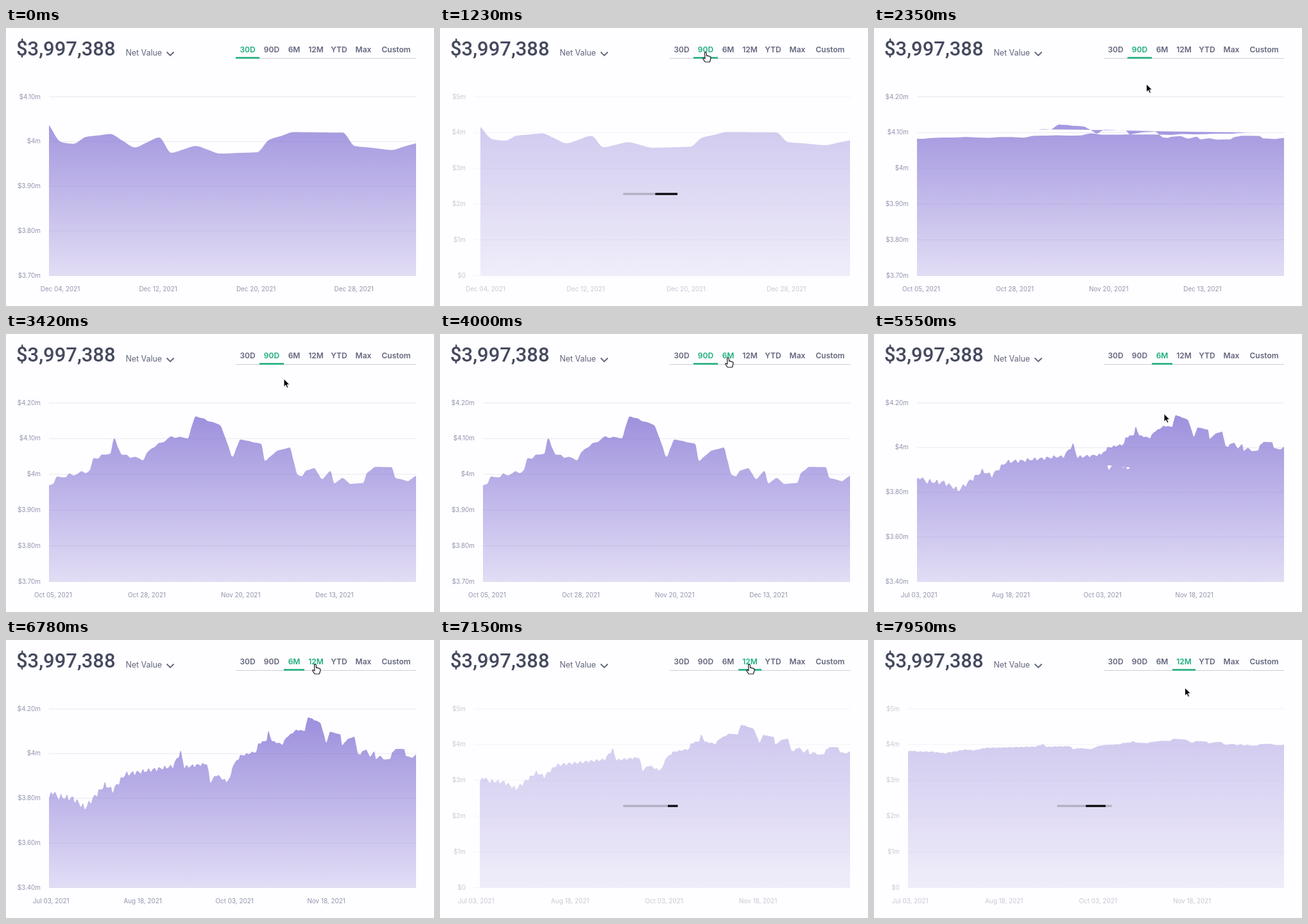
These frames come from a looping animation (667 px wide and 434 px high, 8 s). An HTML page:

```html
<!DOCTYPE html>
<html lang="en">
<head>
<meta charset="utf-8">
<title>Net value chart</title>
<style>
html, body { margin: 0; width: 100%; height: 100%; overflow: hidden; background: #fefdff; }
svg { display: block; width: 667px; height: 434px; font-family: Inter, sans-serif; }
.total { font: 500 31px Roboto, sans-serif; fill: #454a5f; }
.kind { font-size: 12.4px; fill: #5f647b; }
.tab { font-size: 12px; font-weight: 600; text-anchor: middle; fill: #62667c; }
.tab.on { fill: #1aae7a; }
.y, .x { font-size: 9.9px; fill: #8f95ad; }
.y { text-anchor: end; }
.x { text-anchor: middle; }
.grid { stroke: #e9e8ee; }
</style>
</head>
<body>
<svg viewBox="0 0 667 434">
  <defs>
    <linearGradient id="fade" gradientUnits="userSpaceOnUse" x1="0" x2="0" y1="107" y2="387">
      <stop stop-color="#7e6cd2" stop-opacity=".79"/>
      <stop offset="1" stop-color="#7e6cd2" stop-opacity=".22"/>
    </linearGradient>
    <clipPath id="plot"><rect id="frame" width="667" height="434"/></clipPath>
  </defs>
  <text class="total" x="16" y="42.5">$3,997,388</text>
  <text class="kind" x="186.5" y="42.5">Net Value</text>
  <path d="M250.5 37.5L256 43L261.5 37.5" fill="none" stroke="#5f647b" stroke-width="1.8"/>
  <path d="M358 47.5H639" stroke="#cfced6"/>
  <g id="tabs"></g>
  <rect id="mark" y="45.3" height="2.5" fill="#1aae7a"/>
  <g id="chart">
    <g id="axes"></g>
    <path id="area" fill="url(#fade)" clip-path="url(#plot)"/>
  </g>
  <g id="loader">
    <rect x="285.5" y="257.5" width="85" height="3.2" fill="#b1aebf"/>
    <rect id="bar" y="257.5" height="3.2" fill="#08080c"/>
  </g>
  <path id="arrow" d="M0 0V12.5L2.9 9.9L4.9 14.3L7 13.4L5.1 9.1H9Z" fill="#0b0b0f" stroke="#fff" stroke-width=".9"/>
  <path id="hand" d="M-1.5 1.2C-1.5-.5 1-.5 1.2 1.2L1.6 5.5L3 5.2L4.2 5.9L5.6 5.8L6.5 6.8Q8 6.5 8 8.2L7.5 11.5L6.2 15H-.8L-3.8 10.8Q-4.8 9-3.4 8.7L-1 10Z" fill="#fff" stroke="#1b1b24" stroke-width="1.2" stroke-linejoin="round"/>
</svg>
<script>
const LOOP = 8000, RIGHT = 639, TOP = 107.5, BASE = 386.5;
const $ = id => document.getElementById(id);
const lerp = (a, b, p) => a + (b - a) * p;
const clamp = p => Math.max(0, Math.min(1, p));
const sine = p => (1 - Math.cos(Math.PI * clamp(p))) / 2;

// Turning points of the curve: day, value in thousands.
const turns = [
  [0, 3800], [2, 3832], [4, 3808], [12, 3800], [18, 3757], [28, 3861], [32, 3836], [38, 3907], [62, 3943],
  [66, 4006], [68, 3940], [79, 3955], [81, 3875], [84, 3905], [89, 3875], [91, 3896], [92, 3943],
  [96, 3990], [104, 4010], [105, 4044], [109, 4060], [110, 4097], [112, 4055], [117, 4042], [119, 4072],
  [124, 4105], [128, 4102], [130, 4163], [136, 4138], [139, 4050], [141, 4098], [146, 4085], [147, 4038],
  [150, 4066], [153, 4075], [155, 3999], [156, 3995], [157, 4010], [159, 4017], [161, 3987], [163, 4009],
  [164, 3975], [166, 3990], [168, 3973], [171, 3976], [172, 4004], [174, 4021], [178, 4020],
  [179, 3990], [182, 3981], [184, 3996]
];

// Daily value: straight between turning points, with a wobble that calms down towards the end.
function value(day) {
  const i = Math.max(1, turns.findIndex(k => k[0] >= day));
  const [a, u] = turns[i - 1], [b, v] = turns[i];
  return lerp(u, v, (day - a) / (b - a)) + 14 * Math.sin(day * 2.3) * clamp((150 - day) / 150);
}
const days = Array.from({ length: 185 }, (_, day) => value(day));

const wide = { left: 53, min: 0, max: 5000, tick: 1000 };
const view = (count, min, max, tick, first, step, ...dates) =>
  ({ data: days.slice(-count), axis: { left: 67, min, max, tick }, first, step, dates });
const month = view(31, 3700, 4100, 100, .92, 8, "Dec 04", "Dec 12", "Dec 20", "Dec 28");
const quarter = view(91, 3700, 4200, 100, 1, 23, "Oct 05", "Oct 28", "Nov 20", "Dec 13");
const half = view(185, 3400, 4200, 200, 1, 46, "Jul 03", "Aug 18", "Oct 03", "Nov 18");

// A phase with "old" grows out of that range; one with "loading" flattens onto the wide axis.
const phases = [
  { at: 0, tab: 0, range: month },
  { at: 1050, tab: 1, range: month, loading: true },
  { at: 2110, tab: 1, range: quarter, old: month },
  { at: 4010, tab: 2, range: quarter, loading: true },
  { at: 4830, tab: 2, range: half, old: quarter },
  { at: 6950, tab: 3, range: half, loading: true }
];

// Pointer stops: arrival time, x, y.
const TRAVEL = 520;
const stops = [[0, 690, 128], [860, 414, 38], [1750, 424.5, 87.5], [3350, 432, 72], [3860, 449, 37],
  [4560, 452, 124.5], [6660, 482, 38], [7700, 484.5, 74.5]];

const edges = [358, 395, 433, 465, 501, 537, 577, 639];
$("tabs").innerHTML = ["30D", "90D", "6M", "12M", "YTD", "Max", "Custom"]
  .map((s, i) => `<text class="tab" x="${(edges[i] + edges[i + 1]) / 2}" y="38.3">${s}</text>`).join("");
const tabs = [...$("tabs").children];

const xAt = (i, n, axis) => lerp(axis.left, RIGHT, i / (n - 1));
const yAt = (v, axis) => lerp(BASE, TOP, (v - axis.min) / (axis.max - axis.min));
const place = (data, axis) => data.map((v, i) => [xAt(i, data.length, axis), yAt(v, axis)]);
const mix = ([x, y], [u, v], p) => [lerp(x, u, p), lerp(y, v, p)];

function points({ range, old, loading }, age) {
  const own = place(range.data, range.axis), flat = place(range.data, wide);
  if (loading) return own.map((pt, i) => mix(pt, flat[i], sine(age / 500)));
  if (!old) return own;
  // The old points come first and the surplus follows, so the outline folds back on itself.
  const from = [...place(old.data, wide), ...flat.slice(old.data.length)];
  return own.map((pt, i) => mix(from[i], pt, sine(age / 1000)));
}

function outline(pts) {
  const last = pts.length - 1;
  const dx = i => pts[i + 1][0] - pts[i][0];
  const slope = i => (pts[i + 1][1] - pts[i][1]) / (dx(i) || 1e-6);
  const tangent = i => {
    if (i === 0) return slope(0);
    if (i === last) return slope(last - 1);
    const a = slope(i - 1), b = slope(i);
    return dx(i - 1) <= 0 || dx(i) <= 0 || a * b <= 0 ? 0 : 2 * a * b / (a + b);
  };
  let d = `M${pts[0][0]} ${BASE}L${pts[0]}`;
  for (let i = 0; i < last; i++) {
    const [x, y] = pts[i], [u, v] = pts[i + 1], h = dx(i) / 3;
    d += `C${x + h} ${y + h * tangent(i)} ${u - h} ${v - h * tangent(i + 1)} ${u} ${v}`;
  }
  return `${d}V${BASE}Z`;
}

const money = v => !v ? "$0" : `$${v % 1000 ? (v / 1000).toFixed(2) : v / 1000}m`;

function axes(range, axis) {
  let out = "";
  for (let v = axis.min; v <= axis.max; v += axis.tick) {
    const y = yAt(v, axis);
    out += `<path class="grid" d="M${axis.left} ${y}H${RIGHT}"/>
      <text class="y" x="${axis.left - 13}" y="${y + 3}">${money(v)}</text>`;
  }
  range.dates.forEach((s, i) => {
    const x = xAt(range.first + i * range.step, range.data.length, axis);
    out += `<text class="x" x="${x}" y="410.5">${s}, 2021</text>`;
  });
  return out;
}

function pointer(t) {
  const i = stops.findLastIndex(s => s[0] - TRAVEL <= t);
  const [at, ...to] = stops[i], from = stops[Math.max(0, i - 1)].slice(1);
  return mix(from, to, sine((t - at) / TRAVEL + 1));
}

let shown;
function show(phase) {
  const { range, loading, tab } = shown = phase, axis = loading ? wide : range.axis;
  $("axes").innerHTML = axes(range, axis);
  $("frame").setAttribute("x", axis.left);
  $("mark").setAttribute("x", edges[tab]);
  $("mark").setAttribute("width", edges[tab + 1] - edges[tab]);
  $("loader").style.display = loading ? "" : "none";
}

function draw(t) {
  const phase = phases.findLast(p => p.at <= t), age = t - phase.at;
  if (phase !== shown) show(phase);
  $("area").setAttribute("d", outline(points(phase, age)));
  $("chart").setAttribute("opacity", phase.loading ? 1 - .5 * clamp(age / 150) : 1);

  const tail = (t + 567) % 1132 / 1132 * 85, head = Math.min(85, tail * 1.69);
  $("bar").setAttribute("x", 285.5 + tail);
  $("bar").setAttribute("width", head - tail);

  const [x, y] = pointer(t);
  const over = y < 47 ? edges.findLastIndex(e => e <= x) : -1;
  tabs.forEach((tab, i) => tab.classList.toggle("on", i === phase.tab || i === over));
  for (const id of ["arrow", "hand"]) {
    $(id).setAttribute("transform", `translate(${x} ${y})`);
    $(id).style.display = (id === "hand") === (over >= 0) ? "" : "none";
  }
}

const start = performance.now();
function tick() {
  draw((performance.now() - start) % LOOP);
  requestAnimationFrame(tick);
}
tick();
</script>
</body>
</html>
```
